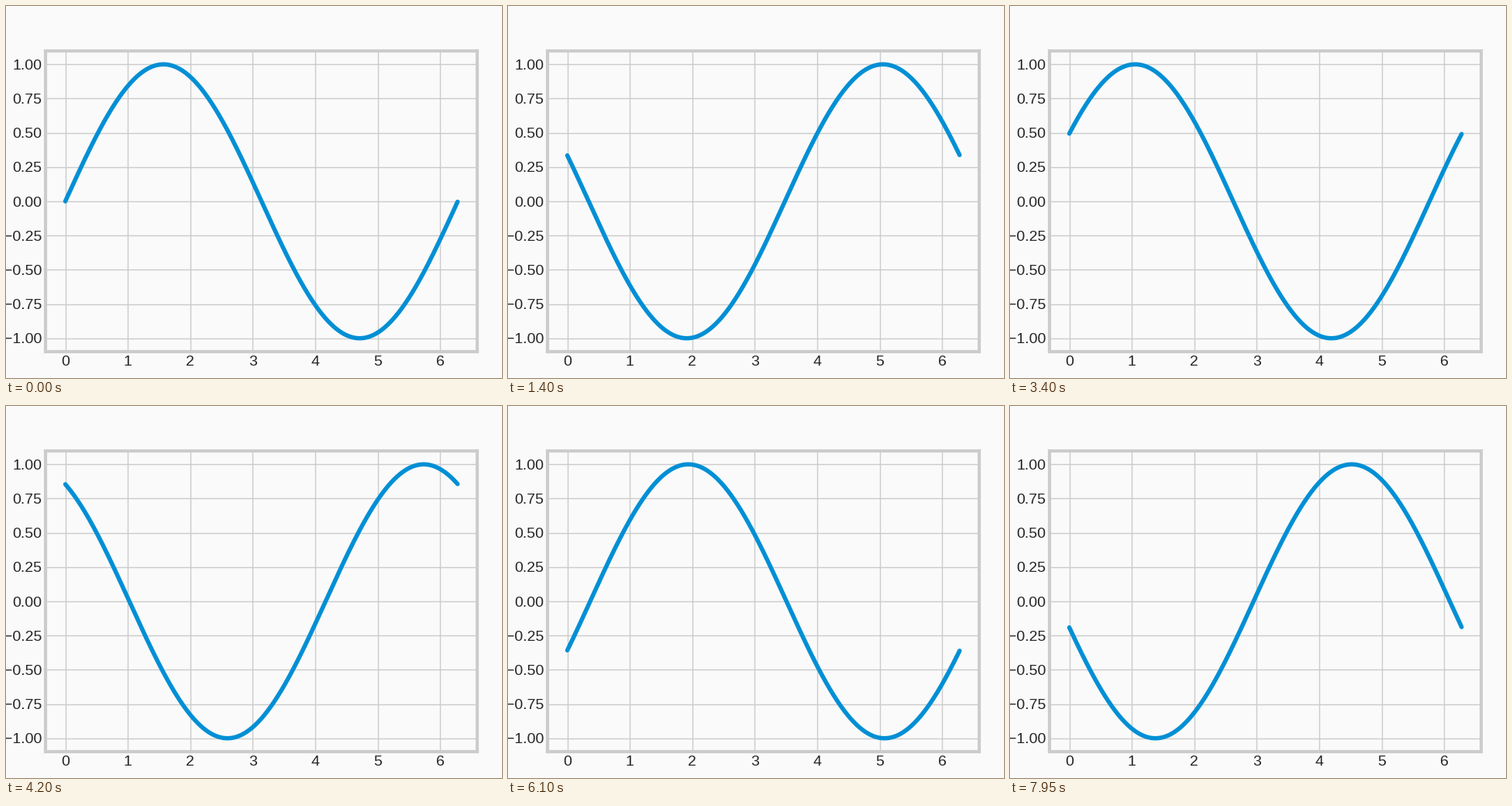
Animation, 640 px wide and 480 px high, one loop 8 s. Source, as a matplotlib script:

```python
import numpy as np
import matplotlib.pyplot as plt
from matplotlib.animation import FuncAnimation

FRAMES = 160
INTERVAL = 50  # ms
PAPER = "#fafafa"

plt.rcParams.update({
    "font.family": "Liberation Sans",
    "font.size": 14,
    "figure.facecolor": PAPER,
    "axes.facecolor": PAPER,
    "axes.edgecolor": "#cccccc",
    "axes.linewidth": 3,
    "axes.grid": True,
    "axes.axisbelow": True,
    "grid.color": "#cbcbcb",
    "grid.linestyle": "-",
    "grid.linewidth": 1,
    "xtick.color": "#262626",
    "ytick.color": "#262626",
    "xtick.major.size": 0,
    "ytick.major.size": 0,
    "lines.linewidth": 4,
    "lines.solid_capstyle": "round",
    "figure.subplot.left": 0.08,
    "figure.subplot.right": 0.95,
    "figure.subplot.bottom": 0.07,
    "figure.subplot.top": 0.88,
})

fig, ax = plt.subplots(figsize=(6.4, 4.8), dpi=100)
x = np.arange(0, 2 * np.pi, 0.01)
wave, = ax.plot(x, np.sin(x), color="#008fd5")


def update(i):
    wave.set_ydata(np.sin(x + i / 10))
    return wave,


anim = FuncAnimation(fig, update, frames=FRAMES, interval=INTERVAL,
                     repeat=True, repeat_delay=0)
plt.show()
```
